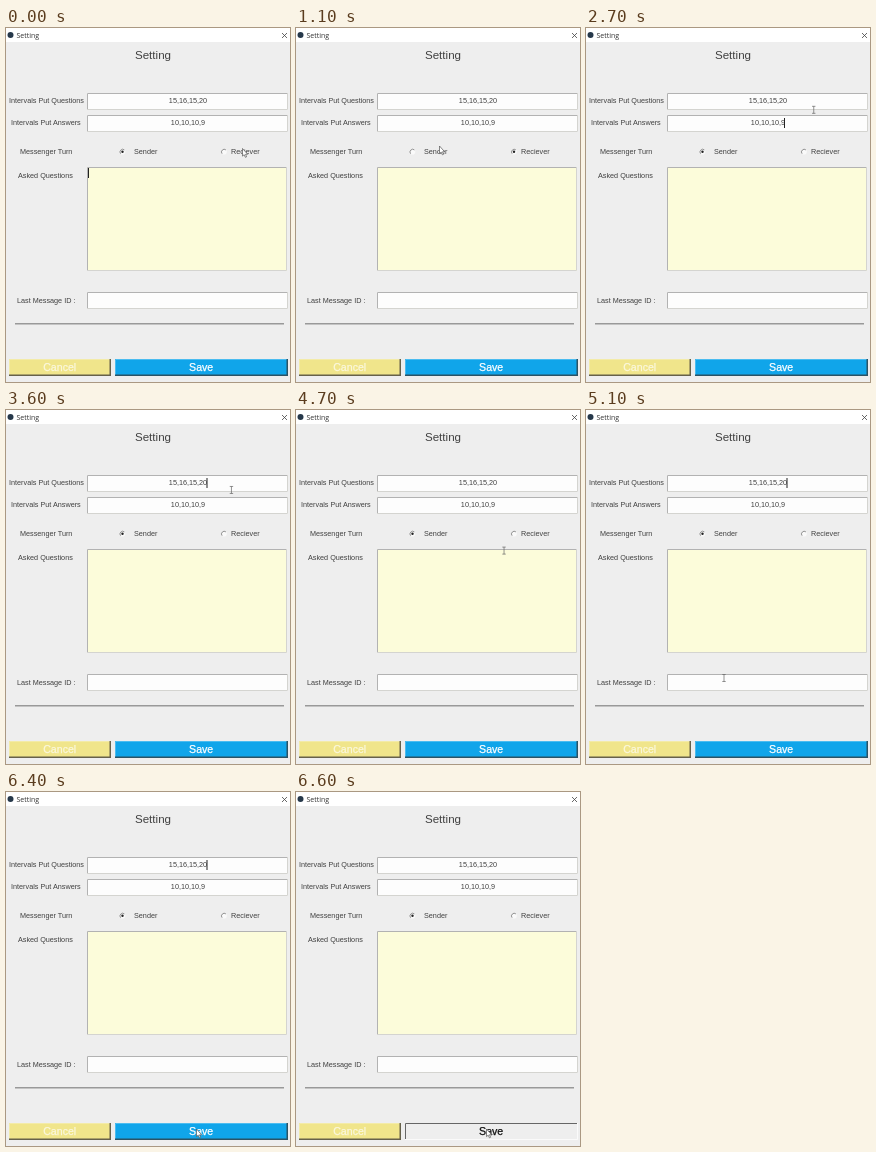
An HTML page that plays this animation: 284 by 354 pixels, repeating every 6.7 s.

```html
<!DOCTYPE html>
<html lang="en">
<head>
<meta charset="utf-8">
<title>Setting</title>
<style>
  html, body { margin: 0; width: 100%; height: 100%; overflow: hidden; background: #eee; }
  svg { display: block; width: 284px; height: 354px; }
  text { font: 7.25px "Liberation Sans", Arial, sans-serif; fill: #404040; }
  .mid { text-anchor: middle; }
  .bar { font: 7px "Open Sans", sans-serif; fill: #333; }
  .head { font-size: 11.6px; }
  .button { font-size: 10.6px; fill: #fff; stroke: #fff; stroke-width: .25; }
  .button.pressed { fill: #111; stroke: #111; }
</style>
</head>
<body>
<svg viewBox="0 0 284 354">
  <rect width="284" height="354" fill="#eee"/>
  <rect width="284" height="14" fill="#fff"/>
  <circle cx="4.5" cy="7" r="3" fill="#26384a"/>
  <text class="bar" x="10.5" y="9.6">Setting</text>
  <path d="M276 5l5 5m0-5l-5 5" stroke="#444" stroke-width=".8"/>
  <text class="head mid" x="147" y="31.2">Setting</text>

  <text x="3" y="75.2">Intervals Put Questions</text>
  <text x="5" y="97.2">Intervals Put Answers</text>
  <text x="14" y="126.4">Messenger Turn</text>
  <text x="128" y="126.4">Sender</text>
  <text x="225" y="126.4">Reciever</text>
  <text x="12" y="150.4">Asked Questions</text>
  <text x="11" y="275">Last Message ID :</text>

  <g id="fields"></g>
  <text class="mid" x="182" y="75.2">15,16,15,20</text>
  <text class="mid" x="182" y="97.2">10,10,10,9</text>
  <g id="radios"></g>
  <rect id="caret" width="1" height="10" fill="#222"/>
  <rect x="9" y="295" width="269" height="1.5" fill="#999"/>

  <g id="buttons"></g>
  <text class="button mid" x="53.7" y="342.6" opacity=".7">Cancel</text>
  <text id="saveText" class="button mid" x="195.2" y="342.6">Save</text>

  <g id="pointer">
    <path id="arrow" d="M.5 0V7.6L2.2 6.2L3.4 8.8L4.6 8.3L3.5 5.8H5.7Z" fill="#fff" stroke="#555" stroke-width=".7"/>
    <path id="beam" d="M-1.7-3.5H1.7M0-3.5V3.5M-1.7 3.5H1.7" stroke="#666" stroke-width=".7" fill="none"/>
  </g>
</svg>
<script>
const LOOP = 6700, STEP = 100, BLINK = 900, CARET_ON = 600;
const $ = id => document.getElementById(id);

function set(node, attrs) {
  for (const key in attrs) node.setAttribute(key, attrs[key]);
}
function add(parent, tag, attrs) {
  const node = document.createElementNS("http://www.w3.org/2000/svg", tag);
  set(node, attrs);
  return parent.appendChild(node);
}
const show = (node, on) => set(node, { visibility: on ? "visible" : "hidden" });

// A filled box with separately coloured top-left and bottom-right edges.
function bevel(parent, { x, y, w, h }, fill, upper, lower, thick = 1) {
  const group = add(parent, "g", { fill: "none", "stroke-width": thick });
  const half = thick / 2, right = x + w - half, bottom = y + h - half;
  add(group, "rect", { x, y, width: w, height: h, fill });
  add(group, "path", { d: `M${x + .5} ${y + h}V${y + .5}H${x + w}`, stroke: upper, "stroke-width": 1 });
  add(group, "path", { d: `M${x} ${bottom}H${right}V${y}`, stroke: lower });
  return group;
}

const entry = y => ({ x: 81, y, w: 201, h: 17 });
const questions = entry(65), answers = entry(87), lastId = entry(264);
const notes = { x: 81, y: 139, w: 200, h: 104 };
const fields = [questions, answers, lastId, notes];
for (const field of fields)
  bevel($("fields"), field, field === notes ? "#fcfcda" : "#fdfdfd", "#b2b2b2", "#d4d4d0");

// Sunken radio buttons: only the upper-left rim is dark.
function radio(x) {
  const group = add($("radios"), "g", { transform: `translate(${x} 123.8)` });
  add(group, "circle", { r: 2.8, fill: "#fafafa" });
  add(group, "path", { d: "M-1.9 1.9A2.7 2.7 0 0 1 1.9-1.9", fill: "none", stroke: "#777", "stroke-width": .8 });
  return add(group, "circle", { r: 1.2, fill: "#222" });
}
const sender = radio(116.5), receiver = radio(218);

const button = (x, w) => ({ x, y: 331, w, h: 17 });
bevel($("buttons"), button(3, 102), "#f0e58b", "#f3eba8", "#66614a", 1.5);
const saveUp = bevel($("buttons"), button(109, 173), "#10a5ea", "#4bbcf0", "#2b5365", 1.5);
const saveDown = bevel($("buttons"), button(109, 173), "#eee", "#666", "#fafafa");

const glide = (from, to, x, y) => ({ from, to, x, y });
const glides = [
  glide(0, 0, 236, 120.5),
  glide(800, 1100, 143, 118),
  glide(1700, 2100, 228, 87),
  glide(2600, 2900, 227, 67),
  glide(3500, 3800, 221, 117),
  glide(4600, 5000, 138, 268),
  glide(5300, 5700, 229, 280),
  glide(5700, 6300, 190, 337)
];

const clamp = k => Math.min(1, Math.max(0, k));
const ease = k => k * k * (3 - 2 * k);

function pointerAt(t) {
  return glides.reduce((p, { from, to, x, y }) => {
    const k = ease(clamp((t - from) / (to - from || 1)));
    return { x: p.x + (x - p.x) * k, y: p.y + (y - p.y) * k };
  }, glides[0]);
}

const contains = (box, p) =>
  p.x >= box.x && p.x <= box.x + box.w && p.y >= box.y && p.y <= box.y + box.h;

function caretAt(t) {
  if (t < 2100) return { x: 82, y: notes.y + 1 };
  if (t < 2800) return { x: 198, y: answers.y + 3 };
  return { x: 200.5, y: questions.y + 3 };
}

function draw(t) {
  const p = pointerAt(t);
  const overField = fields.some(field => contains(field, p));
  set($("pointer"), { transform: `translate(${p.x} ${p.y})` });
  show($("arrow"), !overField);
  show($("beam"), overField);

  const receiving = t >= 700 && t < 1600;
  show(sender, !receiving);
  show(receiver, receiving);

  set($("caret"), caretAt(t));
  show($("caret"), (t + 400) % BLINK < CARET_ON);

  const pressed = t >= 6600;
  show(saveUp, !pressed);
  show(saveDown, pressed);
  $("saveText").classList.toggle("pressed", pressed);
}

function tick() {
  const t = performance.now() % LOOP;
  draw(Math.floor(t / STEP) * STEP);
  requestAnimationFrame(tick);
}
tick();
</script>
</body>
</html>
```
